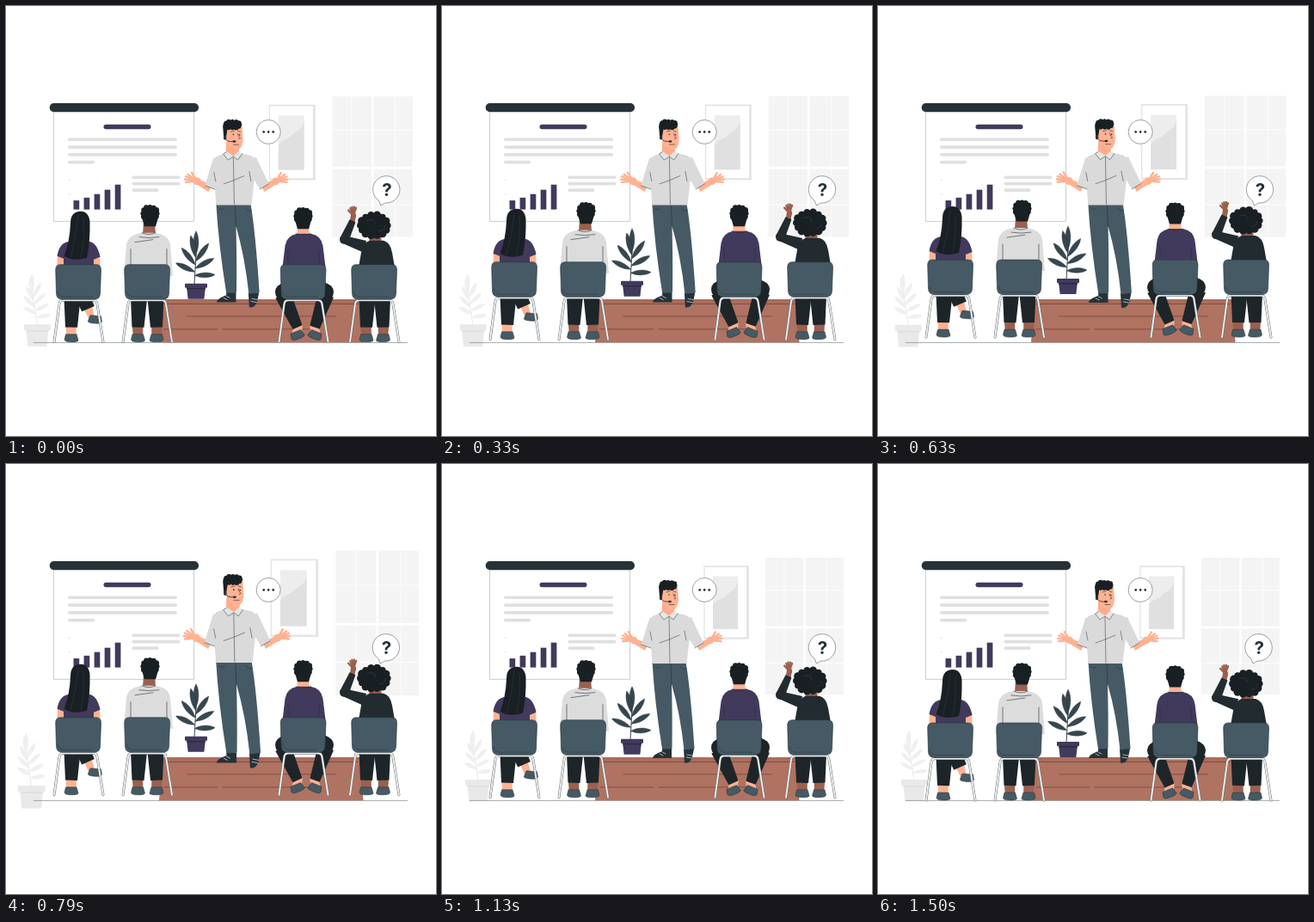
An HTML page for the animation above (1.54 s loop, 500 px wide and 500 px high).

```html
<!DOCTYPE html>
<html lang="en">
<head>
<meta charset="utf-8">
<title>Presentation</title>
<style>
html, body { margin: 0; width: 100%; height: 100%; overflow: hidden; background: #fff; }
svg { display: block; width: 100vw; height: 100vh; }
</style>
</head>
<body>
<svg viewBox="0 0 500 500">
  <g class="zoom" id="room"></g>
  <path d="M32 391.400H467" stroke="#7d868a" stroke-width=".7"/>
  <g id="screen"></g>
  <g id="stage"></g>
  <g class="zoom" id="speaker"></g>
  <g id="talk"></g>
  <g id="ask">
    <path d="M434 226.500L436 232L441.500 229A15.700 15.700 0 1 0 434 226.500Z" fill="#fff" stroke="#263238" stroke-width=".45"/>
    <text x="443.200" y="220.800" text-anchor="middle" font-family="Inter, sans-serif" font-weight="700" font-size="20.500" fill="#263238">?</text>
  </g>
  <g id="front"></g>
</svg>
<script>
const INK = '#263238', SLATE = '#455a64', BLACK = '#1d2529', HAIR = '#192024';
const PURPLE = '#423a5c', PALE = '#dadada', PEACH = '#ffb292', BROWN = '#9b604e';
const $ = id => document.getElementById(id);
const range = n => [...Array(n).keys()];
const repeat = (n, f) => range(n).map(f).join('');

// shapes
const rect = (x, y, w, h, fill, r = 0) => `<rect x="${x}" y="${y}" width="${w}" height="${h}" rx="${r}" fill="${fill}"/>`;
const path = (d, fill, extra = '') => `<path d="${d}" fill="${fill}" ${extra}/>`;
const line = (d, color = INK, w = .6) => path(d, 'none', `stroke="${color}" stroke-width="${w}" stroke-linecap="round" stroke-linejoin="round"`);
const oval = (x, y, rx, ry, fill) => `<ellipse cx="${x}" cy="${y}" rx="${rx}" ry="${ry}" fill="${fill}"/>`;
const dot = (x, y, r, fill) => oval(x, y, r, r, fill);

// limb from (x, y) to (u, v), width w narrowing to e
function limb(x, y, w, u, v, e, fill) {
  const len = Math.hypot(u - x, v - y), nx = (v - y) / len / 2, ny = (x - u) / len / 2;
  return path(`M${x - nx * w} ${y - ny * w}L${x + nx * w} ${y + ny * w}L${u + nx * e} ${v + ny * e}L${u - nx * e} ${v - ny * e}Z`, fill);
}

// mop of hair: an oval ringed with curls
const mop = (x, y, rx, ry, r, n = 12) => oval(x, y, rx, ry, HAIR) + repeat(n, i => {
  const a = i / n * 2 * Math.PI;
  return dot(x + rx * Math.cos(a) * .88, y + ry * Math.sin(a) * .88, r * (1 + i % 3 * .12), HAIR);
});

// open hand: fingers fan out around an angle, the thumb on one side
function hand(x, y, deg, reach, thumb, skin) {
  const ray = (turn, len, w) => {
    const a = (deg + turn) * Math.PI / 180;
    return line(`M${x} ${y}L${x + len * Math.cos(a)} ${y + len * Math.sin(a)}`, skin, w);
  };
  return dot(x, y, reach * .3, skin) + repeat(4, i => ray(i * 14 - 21, reach * (1 - Math.abs(i - 1.500) * .07), 2.300)) + ray(thumb, reach * .8, 2.400);
}

// pot plant: leaves alternate down the stem and open out
function plant(x, top, foot, lean, n, len, w, turn, fill, vein) {
  const gap = (foot - top) / (n + 1.500);
  return line(`M${x + lean} ${foot}L${x} ${top}`, vein, .9) + repeat(n, i => {
    const side = i % 2 ? -1 : 1, deg = side * i * turn + (i && side > 0 ? 10 : 0);
    const l = len * (1 - i * .02);
    return path(`M0 0C${w * 1.300} ${-l * .35} ${w * 1.200} ${-l * .75} 0 ${-l}C${-w * 1.200} ${-l * .75} ${-w * 1.300} ${-l * .35} 0 0Z`, fill,
      `transform="translate(${x + lean * i / n} ${top + i * gap}) rotate(${deg})" stroke="${vein}" stroke-width=".4"`);
  });
}

const pot = (x, y, w, h, fill, shade) =>
  path(`M${x - w * .42} ${y + h * .25}H${x + w * .42}L${x + w * .36} ${y + h}H${x - w * .36}Z`, fill) +
  rect(x - w / 2, y, w, h * .28, fill, .8) + rect(x - w * .42, y + h * .28, w * .84, 1.400, shade);

// audience parts
const shoe = (x, y, side, tilt = 0) => path('M-6 0H6.500L8 6Q8 9 0 9T-8 7Q-7 3-6 0Z', SLATE,
  `transform="translate(${x} ${y}) rotate(${tilt}) scale(${side} 1)" stroke="${INK}" stroke-width=".5"`);

const leg = (x, side, skin) => limb(x + side * .5, 370, 12.500, x, 384, 11.500, skin) +
  limb(x - side, 341, 19, x, 374, 14, BLACK) + shoe(x, 382, side);

const torso = (x, w, y, fill, hem = 304) =>
  path(`M${x - 8} ${y}Q${x - w + 5} ${y + 2} ${x - w + 3} ${y + 14}L${x - w} ${hem}H${x + w}L${x + w - 3} ${y + 14}Q${x + w - 5} ${y + 2} ${x + 8} ${y}Z`, fill);

const neck = (x, y, skin) => limb(x, y, 13, x, y + 18, 15, skin);
const shortHair = (x, y) => mop(x, y, 9.500, 8.500, 2.700) + limb(x, y + 3, 20, x, y + 15, 13, HAIR);

function chair(x) {
  const y = 301, frame = `M${x - 2} 391L${x + 4} 347Q${x + 4.500} 342.500 ${x + 9} 342.500H${x + 43}Q${x + 47.500} 342.500 ${x + 48} 347L${x + 55} 391`;
  return line(frame, '#59666d', 2.800) + line(frame, '#efefef', 1.900) +
    path(`M${x + 5} ${y}H${x + 47}Q${x + 52.500} ${y} ${x + 52.500} ${y + 6}L${x + 51.500} 335Q${x + 51} 341.500 ${x + 44} 341.500H${x + 8}Q${x + 1} 341.500 ${x + .5} 335L${x - .3} ${y + 6}Q${x - .3} ${y} ${x + 5} ${y}Z`, SLATE, `stroke="${INK}" stroke-width=".6"`) +
    line(`M${x + 2} ${y + 31}Q${x + 3} ${y + 37} ${x + 9} ${y + 37.500}H${x + 43}`, INK, .5);
}

// window, picture and pale plant
$('room').innerHTML =
  [376, 422.700].map(x => rect(x, 109, 44.300, 79.500, '#f4f4f4') + rect(x, 191.300, 44.300, 76.700, '#f4f4f4')).join('') +
  line('M397.900 109V268M447.400 109V268M376 147H467M376 231.700H467', '#fff', .8) +
  rect(304.300, 118.300, 52.500, 85.400, '#e4e4e4') + rect(305.600, 120, 48.400, 81.500, '#fff') +
  rect(315, 130.500, 29, 61.500, '#ededed') +
  path('M344 136C342 148 334 148 330 153S320 156 315 164V192H344Z', '#e0e0e0') +
  plant(36, 329, 368, 6, 9, 19, 2.200, 9, '#f0f0f0', '#e8e8e8') + pot(42, 367, 30, 25, '#e9e9e9', '#dedede');

// slide with text lines and a chart
const textRow = (x, y, w) => rect(x, y, w, 3.700, '#e0e0e0', 1.800);
$('screen').innerHTML =
  path('M55.500 122H218.500V250.400H55.500Z', '#fff', 'stroke="#b4b9bb" stroke-width=".7"') +
  rect(50.700, 113, 173.300, 10.300, INK, 5) + rect(113.500, 137.700, 55, 5.500, PURPLE, 2.700) +
  repeat(4, i => textRow(72, 153.400 + i * 8.800, i < 3 ? 127 : 31)) +
  repeat(3, i => textRow(146.500, 197.400 + i * 7.450, i < 2 ? 56 : 31)) +
  line('M72.500 202.500H75M72.500 219H75', '#dadada') +
  repeat(5, i => {
    const h = 10.500 + 2.800 * i + .45 * i * i;
    return rect(78.500 + i * 12.050, 236.600 - h, 6.700, h, PURPLE);
  });

$('stage').innerHTML =
  path('M182 341H412L415.500 391.200H178Z', '#b07361') + path('M182 341H412V346.300H181.600Z', '#aa6d5b') +
  line('M185 346.500H409M211 360.800H383M184 375.800H246M252 375.800H364', '#663f38', .7);

$('speaker').innerHTML =
  path('M256 329L267 331V342H245Q245 338 256 334Z', INK) + path('M281 331H293L291 341Q288 349 282 347.500Z', INK) +
  line('M253 337L257 339M256 335L260 337M285 338L291 339M284 341L290 342', '#fff') +
  path('M244.500 230H283.500Q289 262 293.500 331L281.500 332.500Q277 290 267 256Q268 290 267.500 331L256 331.500Q247 275 244.500 230Z', SLATE) +
  line('M267 256L266 233M247 235Q251 240 254 235M277 235Q280 240 284 238') +
  limb(238, 213, 9, 224, 206, 6, PEACH) + hand(223, 205, 196, 14.500, 42, PEACH) +
  limb(297, 213, 9, 311, 206, 6, PEACH) + hand(312, 205, -16, 14, -42, PEACH) +
  limb(248.500, 181, 15, 237.500, 212, 12, PALE) + limb(283, 181, 15, 299, 211, 12, PALE) +
  path('M255 173L247 176Q242 178 241 184L244.500 232H284.500L290 184Q288 178 284 176L272 173Z', PALE) +
  limb(263, 160, 14, 263, 176, 15, '#ffab8b') +
  path('M256 171L252.500 174L258 181L264 177L269 181L274 174L270 171L264 176.500Z', '#e5e5e5') +
  line('M256 172L252.500 174L258 181L264 177L269 181L274 174M264 178L265 231M244 205L242 195M284 205L282 194M253 208Q263 205 276 199M232 210L243 214M294 214L304 208', INK, .5) +
  path('M254 143H274L275 158Q274 170 266 170Q255 168 254 143Z', PEACH) +
  mop(263, 141, 9.500, 4.300, 2.300) + limb(255, 142, 6, 254.500, 154, 3, HAIR) +
  line('M261 149L265 148M269 148L272 149M269 151Q269.500 155 272 156L270 157M264 163.500H270') +
  dot(264, 152, .8, INK) + dot(271, 152.500, .8, INK) + oval(254.500, 155.500, 1.700, 2.700, INK) +
  line('M255 157Q257 161 265 160', INK, .8) + oval(265, 160, 1.900, 1.200, INK);

$('talk').innerHTML = '<circle cx="305.200" cy="146.400" r="14" fill="#fff" stroke="#263238" stroke-width=".45"/>' +
  repeat(3, i => dot(299.700 + i * 5.500, 146.400, 1.350, INK));

const longHaired = leg(76, -1, PEACH) +
  limb(95, 350, 10, 100, 364, 7, PEACH) + limb(90, 340, 17, 95.500, 352.500, 16, BLACK) + shoe(104, 360.500, 1, 5) +
  limb(64, 288, 8, 63, 303, 7, PEACH) + limb(105, 288, 8, 106, 303, 7, PEACH) +
  path('M74 274Q62 275 59.500 291L67 294V304H102V295L109.500 292Q106 275 96 274Z', PURPLE) +
  path('M87 239Q75 239 75 253Q74 275 67.500 291Q78 298 94 293Q98 275 97.500 251Q96 239 87 239Z', HAIR) +
  line('M84 244Q82 268 75 293M90 247Q92 266 87 293', '#38454c', .4);

const paleShirt = leg(153.500, -1, BROWN) + leg(175, 1, BROWN) +
  neck(166.500, 249, BROWN) + torso(165.500, 28.500, 264, '#dcdcdc', 314) + shortHair(167.500, 241.500) +
  line('M158 264Q166 268 174 264M155 269Q166 271 178 269M145 303V283M187 303V283M150 275L171 272');

const purpleShirt = [-1, 1].map(s => {
  const knee = 347 + s * 24, foot = 349 + s * 10;
  return limb(foot - s, 370, 10, foot + s, 382, 11, PEACH) + dot(knee, 333, 10, BLACK) +
    limb(347 + s * 12, 328, 22, knee, 333, 20, BLACK) + limb(knee + s, 336, 19, foot, 374, 12, BLACK) + shoe(foot + s * 2, 379, s, s * 22);
}).join('') +
  neck(345.500, 252, PEACH) + torso(346.500, 25, 265, PURPLE) + shortHair(345.500, 244.500) +
  line('M337 265Q345 269 354 265M328 299V285M364 299V286');

const raisedHand = leg(419, -1, BROWN) + leg(438.500, 1, BROWN) +
  hand(404, 244, -92, 10.500, -42, BROWN) + limb(404, 244, 6, 402, 254, 6, BROWN) + neck(429.500, 262, BROWN) +
  torso(431, 21, 273, '#222b30') + limb(417, 280, 14, 393, 272, 9, '#222b30') +
  dot(393, 272, 5, '#222b30') + limb(393, 273, 11, 403, 250, 7.500, '#222b30') +
  mop(428, 255.500, 18, 14, 3.700, 14) + line('M420 250Q428 246 430 254M434 262Q441 262 441 256', '#3d494f', .5);

$('front').innerHTML =
  plant(221, 289, 324, -2, 7, 27, 3.100, 13, '#37474f', INK) + pot(221, 323, 26, 18, PURPLE, '#2b2540') +
  longHaired + paleShirt + purpleShirt + raisedHand + [58, 138, 319.500, 402].map(chair).join('');

// motion
const LOOP = 1540, STEPS = 37;
const bump = (p, from, peak, to) => Math.max(0, Math.min((p - from) / (peak - from), (to - p) / (to - peak)));
const beat = p => 1 + .1 * (bump(p, 0, .1, .3) + bump(p, .4, .5, .6));
const lift = p => -6.800 * bump(p, 0, .5, 1);

function shake(p) {
  const swing = i => i % 10 ? (-1) ** i * Math.min(4, 2 ** (Math.min(i, 10 - i) - 1)) : 0;
  const i = Math.floor(p * 10);
  return swing(i) + (swing(i + 1) - swing(i)) * (p * 10 - i);
}

const zoomed = document.querySelectorAll('.zoom');

// the picture advances in 24 steps per second
function draw(ms) {
  const step = Math.floor(ms % LOOP / LOOP * STEPS + .13);
  const p = (step + 1) % STEPS / STEPS;
  zoomed.forEach(g => g.setAttribute('transform', `translate(250 250) scale(${beat(p)}) translate(-250 -250)`));
  $('front').setAttribute('transform', `translate(0 ${lift(p)})`);
  $('ask').setAttribute('transform', `translate(${shake(p)} 0)`);
}

let start;
function tick(now) {
  start ??= now;
  draw(now - start);
  requestAnimationFrame(tick);
}
draw(0);
requestAnimationFrame(tick);
</script>
</body>
</html>
```
